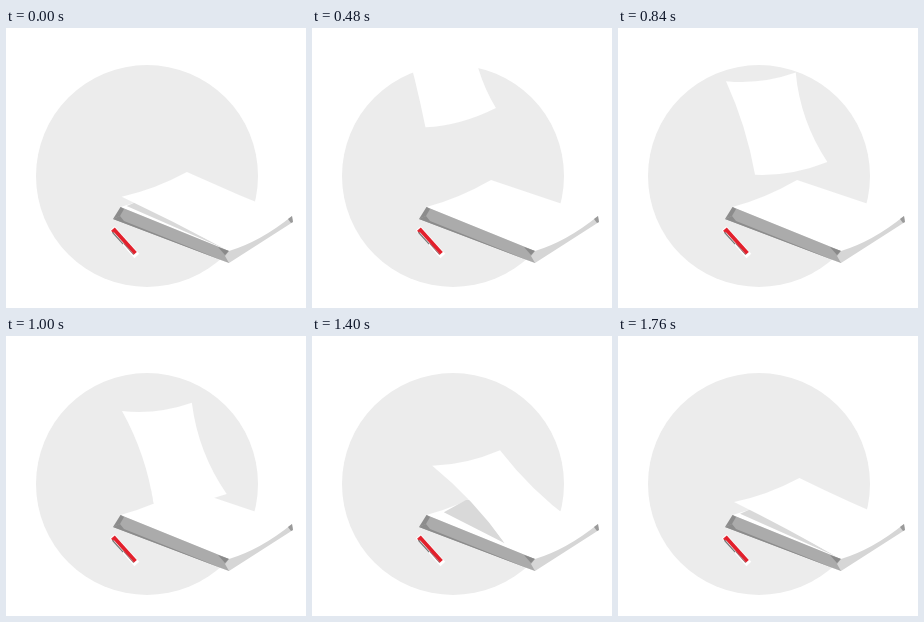
An HTML page with a canvas that plays this animation: 300x280 px, repeating every 1800 ms.

```html
<!DOCTYPE html>
<html lang="en">
<head>
<meta charset="utf-8">
<title>Paper stack</title>
<style>
html, body { margin: 0; width: 100%; height: 100%; overflow: hidden; background: #fff; }
canvas { display: block; }
</style>
</head>
<body>
<canvas id="stage" width="300" height="280"></canvas>
<script>
const ctx = document.getElementById('stage').getContext('2d');
const LOOP = 1800, STEP = 40;
const TOUCH = 1160, LANDED = 2040;

// Corners: top left, top right, bottom right, bottom left
const ENTER = [[66, -62], [135, -72], [150, 8], [82, 36]];
const TOUCHING = [[124, 97], [194, 89], [232, 182], [158, 189]];
const REST = [[114.5, 179], [179, 152], [286, 188], [223, 223]];
const EDGE_POINT = [154, 164];
const SHADE_TIP = [133, 176];

const clamp = u => Math.min(1, Math.max(0, u));
const easeOut = (u, power) => 1 - (1 - u) ** power;
const mix = (a, b, u) => [a[0] + (b[0] - a[0]) * u, a[1] + (b[1] - a[1]) * u];

// Point beside the middle of a side, n pixels to the left of a -> b
function beside(a, b, n) {
  const dx = b[0] - a[0], dy = b[1] - a[1], len = Math.hypot(dx, dy);
  return [(a[0] + b[0]) / 2 + n * dy / len, (a[1] + b[1]) / 2 - n * dx / len];
}

function below(a, b, n) {
  return [(a[0] + b[0]) / 2, (a[1] + b[1]) / 2 + n];
}

function poly(color, ...points) {
  ctx.fillStyle = color;
  ctx.beginPath();
  for (const [x, y] of points) ctx.lineTo(x, y);
  ctx.fill();
}

function curveTo(control, end) {
  ctx.quadraticCurveTo(...control, ...end);
}

function drawSheet(t) {
  const fall = clamp(t / TOUCH);
  const u = clamp((t - TOUCH) / (LANDED - TOUCH));
  const settle = easeOut(u, 1.6);
  // The front corners slide into place sooner than the back ones
  const [tl, tr, br, bl] = REST.map((rest, i) =>
    mix(mix(ENTER[i], TOUCHING[i], fall), rest, i < 2 ? settle : easeOut(u, 2.4)));
  const bow = 12 * (1 - settle), sag = 8 - 3 * settle;
  const left = beside(tl, bl, bow * fall * fall);

  const shade = clamp((t - TOUCH + 220) / 220);
  if (shade > 0 && u < 1) {
    const tip = mix(mix(EDGE_POINT, SHADE_TIP, shade), REST[0], settle ** 3);
    poly('#d9d9d9', tip, EDGE_POINT, left, bl);
  }
  ctx.fillStyle = '#fff';
  ctx.beginPath();
  ctx.moveTo(...tl);
  curveTo(below(tl, tr, sag), tr);
  curveTo(beside(tr, br, -bow), br);
  curveTo(below(br, bl, sag), bl);
  curveTo(left, tl);
  ctx.fill();
}

function drawSides() {
  const [back, , right, front] = REST;
  const low = [223, 235], lowRight = [287, 194], lip = [107, 191];
  poly('#ababab', back, front, low, lip, [114, 187]);
  poly('#8c8c8c', lip, [114, 188], [118, 193], low);
  poly('#8c8c8c', back, [118, 181], [114, 188], lip);
  poly('#8a8a8a', [212, 219], front, [219, 227]);

  ctx.fillStyle = '#d6d6d6';
  ctx.beginPath();
  ctx.moveTo(...front);
  curveTo(below(front, right, 8), right);
  ctx.lineTo(...lowRight);
  ctx.lineTo(...low);
  ctx.lineTo(219, 228);
  ctx.fill();
  poly('#9a9a9a', [282, 191], right, lowRight, [285, 195]);
}

function drawPen() {
  const bar = (color, ...box) => {
    ctx.fillStyle = color;
    ctx.fillRect(...box);
  };
  ctx.save();
  ctx.translate(107, 201);
  ctx.rotate(0.84);
  bar('#fff', -1, -3, 37, 6.5);
  bar('#e2202c', 0, -2.4, 33, 3.8);
  bar('#e2202c', 0, 1, 3, 1.6);
  bar('#777', 2, 1.9, 16, 1.3);
  bar('#8c5a5e', 18, 1.4, 15, 0.8);
  ctx.restore();
}

function draw(now) {
  const t = Math.floor((now % LOOP) / STEP) * STEP;
  ctx.fillStyle = '#fff';
  ctx.fillRect(0, 0, 300, 280);
  ctx.fillStyle = '#ececec';
  ctx.beginPath();
  ctx.arc(141, 148, 111, 0, 7);
  ctx.fill();
  drawSheet(LANDED);
  if (t + LOOP < LANDED) drawSheet(t + LOOP);
  drawSheet(t);
  drawSides();
  drawPen();
}

let start;
function frame(now) {
  if (start === undefined) start = now;
  draw(now - start);
  requestAnimationFrame(frame);
}
draw(0);
requestAnimationFrame(frame);
</script>
</body>
</html>
```
